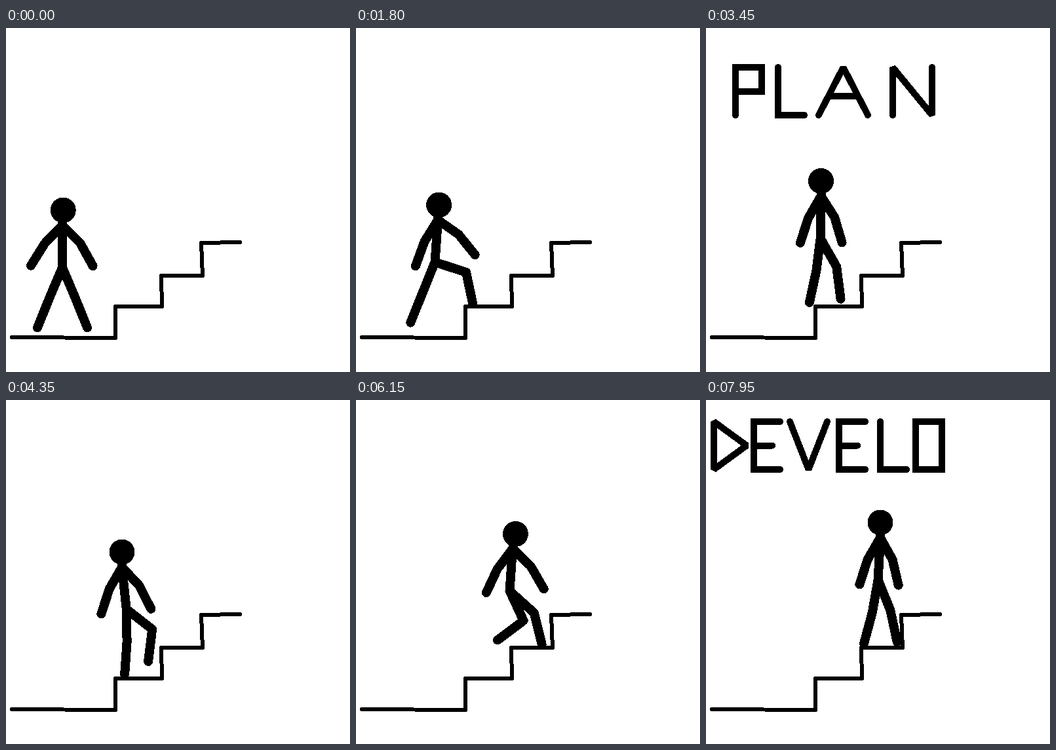
An HTML page for the animation above (8 s loop, 525x525 px).

```html
<!DOCTYPE html>
<html lang="en">
<head>
<meta charset="utf-8">
<title>Climbing the stairs</title>
<style>
html, body { margin: 0; width: 100%; height: 100%; overflow: hidden; background: #fff; }
svg { display: block; shape-rendering: crispEdges; }
path { fill: none; stroke: #000; stroke-linecap: round; stroke-linejoin: round; }
#stairs { stroke-width: 6; }
#body { stroke-width: 14; }
#text { stroke-width: 10; stroke-linejoin: miter; stroke-miterlimit: 1.5; }
</style>
</head>
<body>
<svg width="525" height="525" viewBox="0 0 525 525">
  <path id="stairs" d="M9 472L167 473V425H238L237 378H300L298 328L357 327"/>
  <path id="body"/>
  <circle id="head" r="19.5"/>
  <path id="text"/>
</svg>
<script>
const [body, head, text] = ['body', 'head', 'text'].map(id => document.getElementById(id));
const LOOP = 8000, STEP = 150;
const NECK = 23, SPINE = 64.5, ARM = 38.5, FOREARM = 40, THIGH = 50, SHIN = 49.5;

// Shoulder x, y, then degrees from straight down:
// head lean, spine, back arm, front arm, back thigh, shin, front thigh, shin.
const start   = [86, 301, 3, 0, -44, 45, -23, -22, 23, 22];
const reach   = [125, 293, 4, -4, -32, 55, -22, -22, 72, 12];
const rise    = [152, 270, 1, -4, -31, 55, 14, -29, 64, 17];
const balance = [177, 255, 0, 6, -30, 43, 1, -4, 52, -7];
const climb   = [208, 228, 11, -4, -36, 45, 19, -38, 72, 12];
const land    = [239, 227, 11, -4, -37, 46, 25, -53, 48, 14];
const rest    = [266, 210, 0, -3, -30, 29, -10, -15, 22, 12];

const key = (ms, pose, dx = 0, dy = 0) => ({ ms, pose: [pose[0] + dx, pose[1] + dy, ...pose.slice(2)] });
const keys = [
  key(0, start), key(1800, reach), key(2700, rise),
  key(3150, rest, -91, 47), // the same stance, one stair lower
  key(4350, balance), key(4500, balance),
  key(5550, climb), key(6150, land), key(6600, rest), key(LOOP, rest)
];

// Letters in a unit box, with their drawn widths where not the usual one.
const glyphs = {
  A: 'M0,1 L.5,0 L1,1 M.25,.6 L.75,.6',
  D: 'M0,0 L1,.5 L0,1 Z',
  E: 'M1,0 L0,0 L0,1 L1,1 M0,.5 L.7,.5',
  L: 'M0,0 L0,1 L1,1',
  N: 'M0,1 L0,0 L1,1 L1,0',
  O: 'M0,0 L1,0 L1,1 L0,1 Z',
  P: 'M0,1 L0,0 L1,0 L1,.5 L0,.5',
  V: 'M0,0 L.5,1 L1,0'
};
const widths = { D: 50, V: 57, A: 75, N: 60 };
const HEIGHT = 73;
const words = [
  { letters: 'PLAN', xs: [45, 110, 172, 285], y: 60, from: 2850, to: 4050 },
  { letters: 'DEVELO', xs: [12, 73, 128, 203, 266, 320], y: 33, from: 7200, to: LOOP }
];

function poseAt(t) {
  const i = keys.findIndex(k => k.ms > t), a = keys[i - 1], b = keys[i];
  const k = (t - a.ms) / (b.ms - a.ms);
  return a.pose.map((v, n) => v + (b.pose[n] - v) * k);
}

function move([x, y], length, degrees) {
  const a = degrees * Math.PI / 180;
  return [x + length * Math.sin(a), y + length * Math.cos(a)];
}

function limb(from, len1, angle1, len2, angle2) {
  const joint = move(from, len1, angle1);
  return `M${from}L${joint}L${move(joint, len2, angle2)}`;
}

function drawFigure([x, y, lean, spine, back, front, thigh1, shin1, thigh2, shin2]) {
  const shoulder = [x, y];
  const top = move(shoulder, -NECK, -lean), hip = move(shoulder, SPINE, spine);
  head.setAttribute('cx', top[0]);
  head.setAttribute('cy', top[1]);
  body.setAttribute('d', `M${top}L${shoulder}L${hip}` +
    limb(shoulder, ARM, back, FOREARM, back + 12) +
    limb(shoulder, ARM, front, FOREARM, front - 16) +
    limb(hip, THIGH, thigh1, SHIN, shin1) +
    limb(hip, THIGH, thigh2, SHIN, shin2));
}

function letterPath(letter, x, y) {
  const width = widths[letter] || 40;
  return glyphs[letter].replace(/([\d.]+),([\d.]+)/g, (_, u, v) => `${x + u * width},${y + v * HEIGHT}`);
}

// One more letter appears with every step.
function wordPath({ letters, xs, y, from, to }, t) {
  if (t < from || t >= to) return '';
  const count = (t - from) / STEP + 1;
  return [...letters].slice(0, count).map((letter, i) => letterPath(letter, xs[i], y)).join('');
}

function frame(now) {
  const t = Math.floor(now % LOOP / STEP) * STEP;
  drawFigure(poseAt(t));
  text.setAttribute('d', words.map(word => wordPath(word, t)).join(''));
  requestAnimationFrame(frame);
}
requestAnimationFrame(frame);
</script>
</body>
</html>
```
